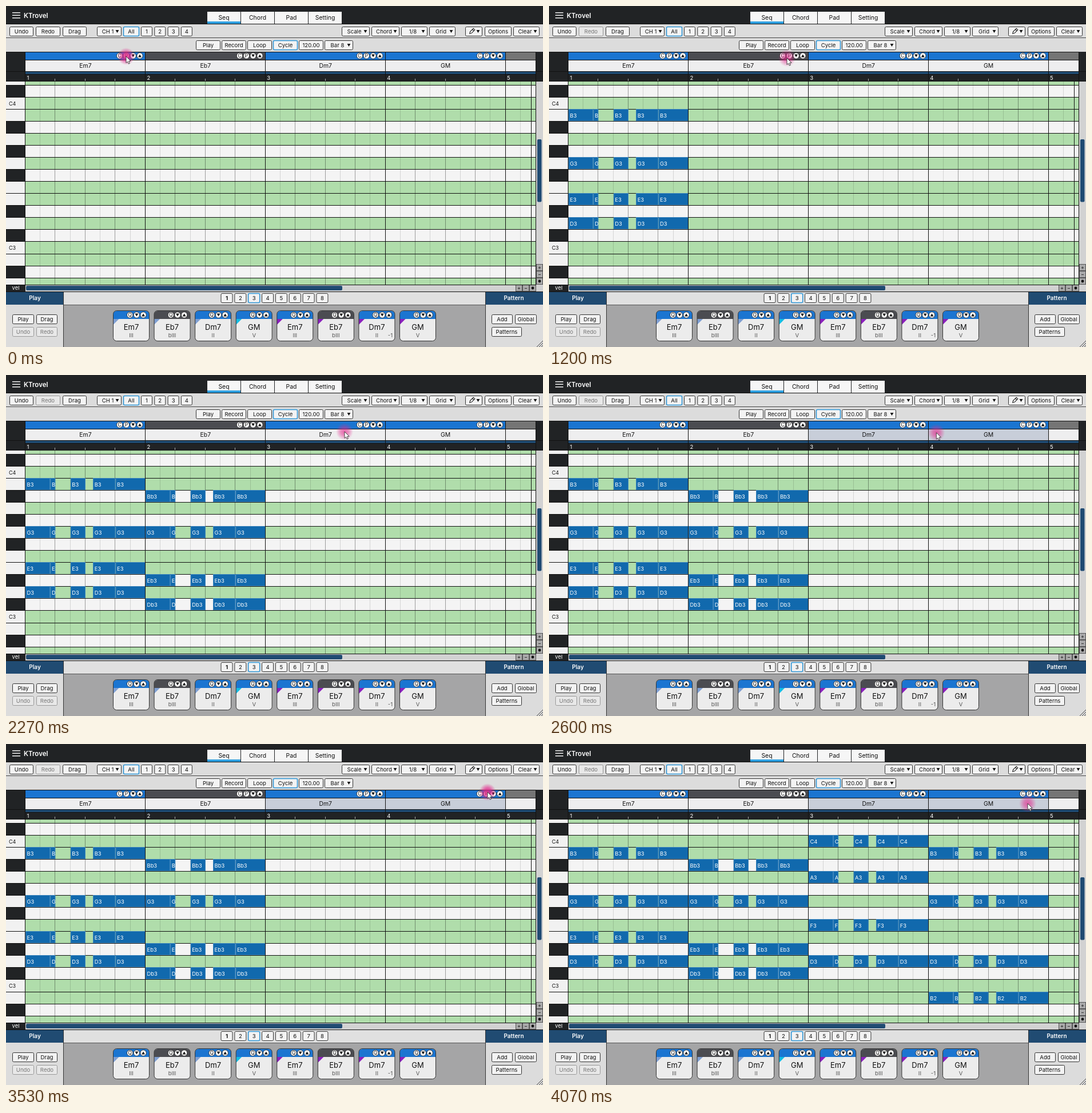
Recreate the animation shown at these times as an HTML page with a canvas. Size 939 px wide and 596 px high, loop 4140 ms.

```html
<!DOCTYPE html>
<html lang="en">
<head>
<meta charset="utf-8">
<title>Phrase sequencer</title>
<style>
html, body { margin: 0; width: 100%; height: 100%; overflow: hidden; background: #222; }
canvas { display: block; width: 939px; height: 596px; }
</style>
</head>
<body>
<canvas id="stage" width="939" height="596"></canvas>
<script>
const ctx = document.getElementById('stage').getContext('2d');
const FONT = 'Inter, "Liberation Sans", sans-serif';
const DARK = '#212325', NAVY = '#204b72', BLUE = '#1b75d1', SLATE = '#4b4c51';
const INK = '#111', PAPER = '#f3f3f3', GREEN = '#b0ddab', ACTIVE = '#2f96d6', TRACK = '#d2d2d2';
const LEFT = 34, BAR = 209.9, EIGHTH = BAR / 8;
const TOP = 131.5, C4_Y = 159.5, ROW = 21.04;
const LOOP = 4140, FPS = 15;

const CHORDS = ['Em7', 'Eb7', 'Dm7', 'GM'];
const ROMAN = ['III', 'bIII', 'II', 'V'];
const SCALE = ['C', 'Db', 'D', 'Eb', 'E', 'F', 'Gb', 'G', 'Ab', 'A', 'Bb', 'B'];
// Pitches are counted in semitones below C4
const VOICES = [[1, 5, 8, 10], [2, 5, 9, 11], [0, 3, 7, 10], [1, 5, 10, 13]];
const RHYTHM = [[0, 1.65], [1.65, 2], [3, 4], [4.5, 6], [6, 8]];
const FILLED_AT = [11, 24, 54, 54];

// Pointer path: tick, x, y, easing into this point
const PATH = [
  [10.5, 210, 88], [18, 416, 91, 'both'], [20, 420, 87, 'out'],
  [27, 420, 87], [34, 592, 99, 'both'], [35, 592, 99],
  [43, 788, 103, 'in'], [44, 808, 95], [50, 842, 84, 'out'],
  [54.5, 842, 84], [61, 837, 104, 'both']
];
const PRESSES = [[0, 11], [23, 28], [53, 56]];
const EASE = {
  in: p => p ** 1.2,
  out: p => 1 - (1 - p) ** 2,
  both: p => p * p * (3 - 2 * p)
};

function rect(x, y, w, h, color) {
  ctx.fillStyle = color;
  ctx.fillRect(x, y, w, h);
}

function hline(x1, x2, y, color = '#111') { rect(x1, Math.round(y), x2 - x1, 1, color); }
function vline(x, y1, y2, color = '#111') { rect(Math.floor(x), y1, 1, y2 - y1, color); }

function text(str, x, y, size, color = INK, align = 'center', weight = 400) {
  ctx.font = `${weight} ${size}px ${FONT}`;
  ctx.textAlign = align;
  ctx.fillStyle = color;
  ctx.fillText(str, x, y + size * 0.364);
}

function box(x, y, w, h, r, fill, stroke, line = 1) {
  ctx.beginPath();
  ctx.roundRect(x, y, w, h, r);
  if (fill) { ctx.fillStyle = fill; ctx.fill(); }
  if (stroke) { ctx.strokeStyle = stroke; ctx.lineWidth = line; ctx.stroke(); }
}

function poly(points, fill, stroke, line = 1) {
  ctx.beginPath();
  points.forEach(([x, y]) => ctx.lineTo(x, y));
  ctx.closePath();
  if (fill) { ctx.fillStyle = fill; ctx.fill(); }
  if (stroke) { ctx.strokeStyle = stroke; ctx.lineWidth = line; ctx.stroke(); }
}

function arrow(x, y, dir, w = 2.9) {
  poly([[x - w, y - 2.4 * dir], [x + w, y - 2.4 * dir], [x, y + 2.6 * dir]], INK);
}

function button(label, x1, x2, y, { on, off, menu, bold } = {}) {
  box(x1 + 0.5, y + 0.5, x2 - x1 - 1, 16, 2, off ? '#e8e8e8' : PAPER,
    on ? ACTIVE : off ? '#999' : '#333', on ? 1.6 : 1);
  text(label, (x1 + x2) / 2 - (menu ? 2.5 : 0), y + 8.5, 9.6, off ? '#777' : INK, 'center', bold ? 700 : 400);
  if (menu) arrow(x2 - 7.5, y + 8.5, 1);
}

function chip(x, y, glyph) {
  ctx.beginPath();
  ctx.arc(x, y, 5.2, 0, 7);
  ctx.fillStyle = '#fff';
  ctx.fill();
  ctx.strokeStyle = '#222';
  ctx.lineWidth = 0.8;
  ctx.stroke();
  if (glyph === 'v' || glyph === '^') arrow(x, y, glyph === 'v' ? 1 : -1);
  else text(glyph, x, y, 8.5);
}

function pencil(x, y) {
  ctx.save();
  ctx.translate(x, y);
  ctx.rotate(Math.PI / 4);
  poly([[-1.8, -5], [1.8, -5], [1.8, 3], [0, 6], [-1.8, 3]], null, INK);
  hline(-2, 2, -3);
  ctx.restore();
}

function topBar() {
  rect(0, 0, 939, 32, DARK);
  for (let i = 0; i < 3; i++) rect(11, 11 + i * 4.6, 14, 1.4, '#fff');
  text('KTrovel', 31, 16.5, 11.5, '#fff', 'left', 600);
  ['Seq', 'Chord', 'Pad', 'Setting'].forEach((name, i) => {
    rect(352 + i * 59, 10, 58, 21, '#f6f6f6');
    text(name, 381 + i * 59, 20.5, 10.4);
  });
  rect(352, 27, 58, 4, '#2d9fe0');
}

function toolbars(redoOff) {
  rect(0, 31, 939, 49, '#dcdcdc');
  hline(0, 939, 31);
  hline(0, 939, 55, '#444');
  button('Undo', 6, 48, 36);
  button('Redo', 52, 95, 36, { off: redoOff });
  button('Drag', 99, 141, 36);
  button('CH 1', 159, 202, 36, { menu: true });
  button('All', 205, 233, 36, { on: true });
  for (let i = 0; i < 4; i++) button(String(i + 1), 236 + i * 23.3, 256 + i * 23.3, 36);
  button('Scale', 587, 636, 36, { menu: true });
  button('Chord', 639, 688, 36, { menu: true });
  button('1/8', 691, 737, 36, { menu: true });
  button('Grid', 740, 786, 36, { menu: true });
  button('', 803, 833, 36, { menu: true });
  pencil(815, 44);
  button('Options', 837, 884, 36);
  button('Clear', 887, 933, 36, { menu: true });
  button('Play', 332, 375, 60);
  button('Record', 377, 420, 60);
  button('Loop', 422, 465, 60);
  button('Cycle', 467, 510, 60, { on: true });
  button('120.00', 512, 555, 60);
  button('Bar 8', 557, 607, 60, { menu: true });
}

function header(selected) {
  rect(0, 80, 939, 52, DARK);
  for (let i = 0; i < 5; i++) {
    const x = LEFT + i * BAR, w = Math.min(BAR, 926 - x);
    rect(x, 81, w, 13, i === 4 ? '#757575' : i === 1 ? SLATE : BLUE);
    rect(x, 94, w, 20, selected.includes(i) ? '#c8ced9' : '#eeeeef');
    if (i < 4) {
      text(CHORDS[i], x + BAR / 2, 104.5, 10.4);
      ['C', 'P', 'v', '^'].forEach((g, k) => chip(x + 164.6 + k * 11.8, 87, g));
    }
  }
  hline(0, 926, 80);
  hline(33, 926, 94);
  hline(33, 926, 114);
  rect(33, 115, 893, 4, NAVY);
  hline(0, 939, 114);
  hline(33, 926, 119);
  for (let i = 0; i < 5; i++) {
    const x = LEFT + i * BAR;
    text(String(i + 1), x + 2.5, 126, 9.6, '#fff', 'left');
    for (let b = 2; b < 8 && x + b * EIGHTH < 918; b += 2) vline(x + b * EIGHTH - 0.5, 127, 131, '#aaa');
  }
}

function roll(tick) {
  ctx.save();
  ctx.beginPath();
  ctx.rect(0, TOP, 926, 355.5);
  ctx.clip();
  for (let n = -2; n < 16; n++) {
    const y = C4_Y + n * ROW, black = SCALE[(24 - n) % 12].length > 1;
    rect(0, y, 33, ROW + 1, black ? DARK : '#f1f1f1');
    rect(33, y, 893, ROW + 1, black ? '#f4f4f4' : GREEN);
  }
  for (let k = 1; k < 34; k++) {
    if (k % 8) vline(LEFT + k * EIGHTH - 0.5, TOP, 487, k % 2 ? 'rgba(0,0,0,.13)' : 'rgba(0,0,0,.36)');
  }
  for (let n = -1; n < 16; n++) hline(0, 926, C4_Y + n * ROW - 0.5);
  text('C4', 5, C4_Y + 11, 9, INK, 'left');
  text('C3', 5, C4_Y + 12 * ROW + 11, 9, INK, 'left');
  VOICES.forEach((voices, bar) => {
    if (tick >= FILLED_AT[bar]) voices.forEach(n => RHYTHM.forEach(span => note(bar, n, span)));
  });
  ctx.restore();
  for (let i = 0; i < 5; i++) vline(LEFT + i * BAR - 0.5, 80, 487);
  vline(918, TOP, 487);
  vline(926, 80, 487);
  hline(0, 939, 131);
}

function note(bar, n, [from, to]) {
  const x = LEFT + bar * BAR + from * EIGHTH, y = Math.round(C4_Y + n * ROW - 0.5);
  const w = (to - from) * EIGHTH;
  ctx.save();
  ctx.beginPath();
  ctx.rect(x, y, w, 21);
  ctx.clip();
  rect(x, y, w, 21, '#1169ad');
  ctx.strokeStyle = '#4288be';
  ctx.lineWidth = 1;
  ctx.strokeRect(x + 0.5, y + 0.5, w - 1, 20);
  text(SCALE[(24 - n) % 12] + (n > 12 ? 2 : n > 0 ? 3 : 4), x + 2.6, y + 11.5, 9.4, '#fff', 'left');
  ctx.restore();
}

function zoomKey(x, y, w, h, glyph) {
  rect(x, y, w, h, '#a9a9a9');
  ctx.strokeStyle = '#555';
  ctx.lineWidth = 1;
  ctx.strokeRect(x + 0.5, y + 0.5, w - 1, h - 1);
  if (glyph !== 'dot') return text(glyph, x + w / 2, y + h / 2, 9);
  ctx.beginPath();
  ctx.arc(x + w / 2, y + h / 2, 2.4, 0, 7);
  ctx.fillStyle = INK;
  ctx.fill();
}

function scrollbars() {
  rect(927, 132, 12, 355, TRACK);
  box(929, 233, 7.5, 109.5, 2, NAVY);
  rect(0, 487, 34, 12, DARK);
  text('vel', 17, 493, 9.5, '#fff');
  rect(34, 487, 905, 12, TRACK);
  box(35, 489, 553, 8, 2, NAVY);
  ['+', '−', 'dot'].forEach((g, i) => {
    zoomKey(927, 451 + i * 12, 12, 12, g);
    zoomKey(891 + i * 12, 487, 12, 12, g);
  });
  hline(0, 927, 487);
  hline(0, 939, 499);
}

function card(i) {
  const x = 187 + i * 71.57, k = i % 4, cx = x + 32;
  box(x + 0.5, 533, 63, 52.5, 6, '#ececec');
  ctx.save();
  ctx.clip();
  rect(x, 532, 64, 15, k === 1 ? SLATE : BLUE);
  poly([[x, 547], [x + 10.5, 547], [x, 557.5]], i > 3 ? '#8b20bd' : i === 3 ? '#12bde3' : '#7f9fd2');
  ctx.restore();
  box(x + 0.5, 532.5, 63, 53, 6, null, '#333');
  ['Q', 'v', '^'].forEach((g, j) => chip(x + 29.7 + j * 11.7, 540, g));
  text(CHORDS[k], cx, 561.5, 13);
  text(ROMAN[k], cx, 576, 9.6, '#555');
  if (i === 6) text('-1', x + 55.5, 576, 9.6, '#555');
}

function panels() {
  rect(0, 500, 939, 96, '#dcdcdc');
  rect(101, 523, 737, 73, '#a5a5a6');
  rect(101, 500, 737, 22, '#e0e0e0');
  rect(0, 500, 100, 22, NAVY);
  rect(839, 500, 100, 22, NAVY);
  text('Play', 50.5, 510.5, 10, '#fff', 'center', 600);
  text('Pattern', 888, 510.5, 10, '#fff', 'center', 600);
  hline(101, 838, 522, '#555');
  vline(100, 500, 596, '#333');
  vline(838, 500, 596, '#333');
  for (let i = 0; i < 8; i++) {
    button(String(i + 1), 375.5 + i * 23.85, 396.5 + i * 23.85, 502, { on: i === 2, bold: !i });
  }
  for (let i = 0; i < 8; i++) card(i);
  button('Play', 11, 49, 539);
  button('Drag', 53, 90, 539);
  button('Undo', 11, 49, 561, { off: true });
  button('Redo', 53, 90, 561, { off: true });
  button('Add', 849, 886, 539);
  button('Global', 890, 928, 539);
  button('Patterns', 849, 902, 561);
  ctx.strokeStyle = '#444';
  ctx.lineWidth = 1;
  for (let d = 3; d < 12; d += 4) {
    ctx.beginPath();
    ctx.moveTo(939 - d, 596);
    ctx.lineTo(939, 596 - d);
    ctx.stroke();
  }
}

function pointerAt(tick) {
  const i = PATH.findIndex(p => p[0] > tick);
  if (i === 0) return PATH[0].slice(1);
  if (i < 0) return PATH[PATH.length - 1].slice(1);
  const [t0, x0, y0] = PATH[i - 1], [t1, x1, y1, ease] = PATH[i];
  const p = (tick - t0) / (t1 - t0), e = ease ? EASE[ease](p) : p;
  return [x0 + (x1 - x0) * e, y0 + (y1 - y0) * e];
}

function pointer(x, y, pressed) {
  const glow = ctx.createRadialGradient(x, y, 0, x, y, 15);
  const tint = a => `rgba(228,38,140,${a})`;
  glow.addColorStop(0, tint(pressed ? 0.85 : 0.68));
  glow.addColorStop(0.45, tint(pressed ? 0.7 : 0.48));
  glow.addColorStop(1, tint(0));
  ctx.fillStyle = glow;
  ctx.fillRect(x - 15, y - 15, 30, 30);
  const shape = [[0, 0], [0, 11.5], [2.6, 9.2], [4.4, 13.2], [6.3, 12.3], [4.6, 8.4], [8.1, 8.2]];
  poly(shape.map(([dx, dy]) => [x + dx, y + dy]), '#fff', '#333', 0.9);
}

function draw(tick) {
  const [x, y] = pointerAt(tick);
  const selected = tick < 36 ? [] : x > LEFT + 3 * BAR ? [2, 3] : [2];
  topBar();
  toolbars(tick >= 11);
  header(selected);
  roll(tick);
  scrollbars();
  panels();
  pointer(x, y, PRESSES.some(([from, to]) => tick >= from && tick < to));
}

let shown = -1;
function frame(now) {
  const tick = Math.min(61, Math.floor((now % LOOP + 4) * FPS / 1000));
  if (tick !== shown) draw(shown = tick);
  requestAnimationFrame(frame);
}
requestAnimationFrame(frame);
</script>
</body>
</html>
```
